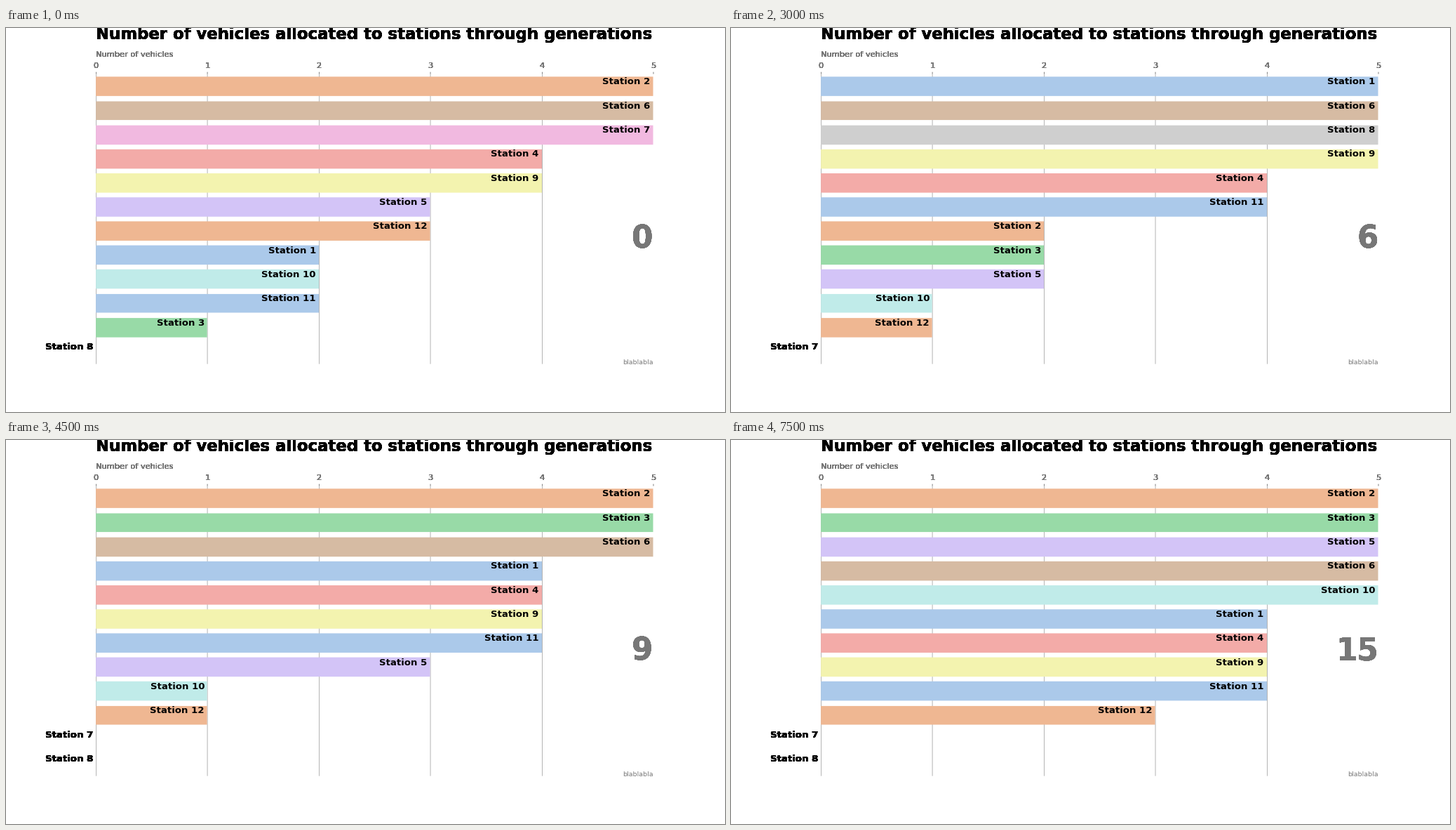
Write a matplotlib script that moves like this. It is 1025x547 px and loops after 8 s.

```python
import colorsys
import math

import matplotlib.pyplot as plt
from matplotlib.animation import FuncAnimation
from matplotlib.colors import to_rgb
from matplotlib.patches import Rectangle

plt.rcParams["text.hinting_factor"] = 32

W, H, DPI = 1025, 547, 64
# The chart is laid out on a 1080 x 576 sheet and scaled to the stage.
SX, SY = W / 1080, H / 576
LEFT, RIGHT, TOP, BOTTOM = 135, 972, 69.12, 504
HEIGHT = BOTTOM - TOP
UNIT = (RIGHT - LEFT) / 5
PITCH = HEIGHT / 12.036
FIRST = TOP + 0.118 * PITCH
GREY = "#777777"
CRISP = 12

PASTEL = ["#a1c9f4", "#ffb482", "#8de5a1", "#ff9f9b", "#d0bbff",
          "#debb9b", "#fab0e4", "#cfcfcf", "#fffea3", "#b9f2f0"]

# Vehicles per station, and per key generation {vehicles: stations that differ}.
BASE = [4, 5, 5, 4, 3, 5, 0, 0, 4, 1, 4, 1]
MUTATIONS = {
    0: {5: [7], 3: [12], 2: [1, 10, 11], 1: [3]},
    2: {5: [1, 8, 9], 2: [2, 3, 5]},
    7: {5: [7, 10], 4: [5], 2: [1, 2], 0: [4, 12]},
    9: {},
    10: {5: [5, 10], 3: [12]},
}
# Generations bred from two others: the head of one and the tail of the next.
PARENTS = {1: (2, 0), 8: (7, 9)}
CUT = 7


def mutated(key):
    plan = BASE[:]
    for vehicles, stations in MUTATIONS[key].items():
        for s in stations:
            plan[s - 1] = vehicles
    return plan


def plan_at(gen):
    if gen in PARENTS:
        head, tail = PARENTS[gen]
        return mutated(head)[:CUT] + mutated(tail)[CUT:]
    return mutated(max(k for k in MUTATIONS if k <= gen))


def muted(color):
    h, l, s = colorsys.rgb_to_hls(*to_rgb(color))
    return colorsys.hls_to_rgb(h, l, s * 0.75)


COLORS = [muted(c) for c in PASTEL]

fig = plt.figure(figsize=(W / DPI, H / DPI), dpi=DPI, facecolor="white")
ax = fig.add_axes([0, 0, 1, 1])


def snap(v):
    return math.floor(v + 0.5)


def box(x0, y0, x1, y1, color):
    # Whole sheet pixels, so scaled edges come out softly blended.
    x0, y0, x1, y1 = map(snap, (x0, y0, x1, y1))
    ax.add_patch(Rectangle((x0 * SX, y0 * SY), (x1 - x0) * SX, (y1 - y0) * SY,
                           fc=color, lw=0, snap=False))


def write(x, y, text, size, color="black", times=1, **kw):
    # Repeated drawing hardens the edges of the letters.
    for _ in range(times):
        ax.text(x * SX, y * SY, text, size=size * SX * 72 / DPI,
                color=color, family="DejaVu Sans", **kw)


def draw_frame():
    for k in range(6):
        x = LEFT + k * UNIT
        if k < 5:
            box(x, TOP, x + 1, BOTTOM, "#b0b0b0")
        box(x, TOP - 3.5, x + 1, TOP, GREY)
        write(x, TOP - 7, str(k), 12, GREY, CRISP, ha="center", va="bottom")
    write(LEFT, TOP - 0.06 * HEIGHT, "Number of vehicles", 12, GREY, CRISP)
    write(LEFT, TOP - 0.12 * HEIGHT,
          "Number of vehicles allocated to stations through generations",
          24, times=CRISP, weight="bold")
    write(RIGHT, BOTTOM, "blablabla", 10, GREY, ha="right")


def draw_bars(plan):
    order = sorted(range(12), key=lambda s: (-plan[s], s))
    for row, station in enumerate(order):
        value = plan[station]
        y = FIRST + row * PITCH
        end = LEFT + value * UNIT
        if value:
            box(LEFT, y, end, y + 0.8 * PITCH, COLORS[station % 10])
        write(end - UNIT / 40, y + 0.4 * PITCH, f"Station {station + 1}", 14,
              times=1 if value else CRISP, weight="bold",
              ha="right", va="bottom")


def update(gen):
    ax.clear()
    ax.set(xlim=(0, W), ylim=(H, 0))
    ax.axis("off")
    draw_frame()
    draw_bars(plan_at(gen))
    write(RIGHT, BOTTOM - 0.4 * HEIGHT, str(gen), 46, GREY, CRISP,
          weight="bold", ha="right")
    return []


anim = FuncAnimation(fig, update, frames=16, interval=500,
                     init_func=lambda: [], repeat=True, repeat_delay=0)
plt.show()
```
